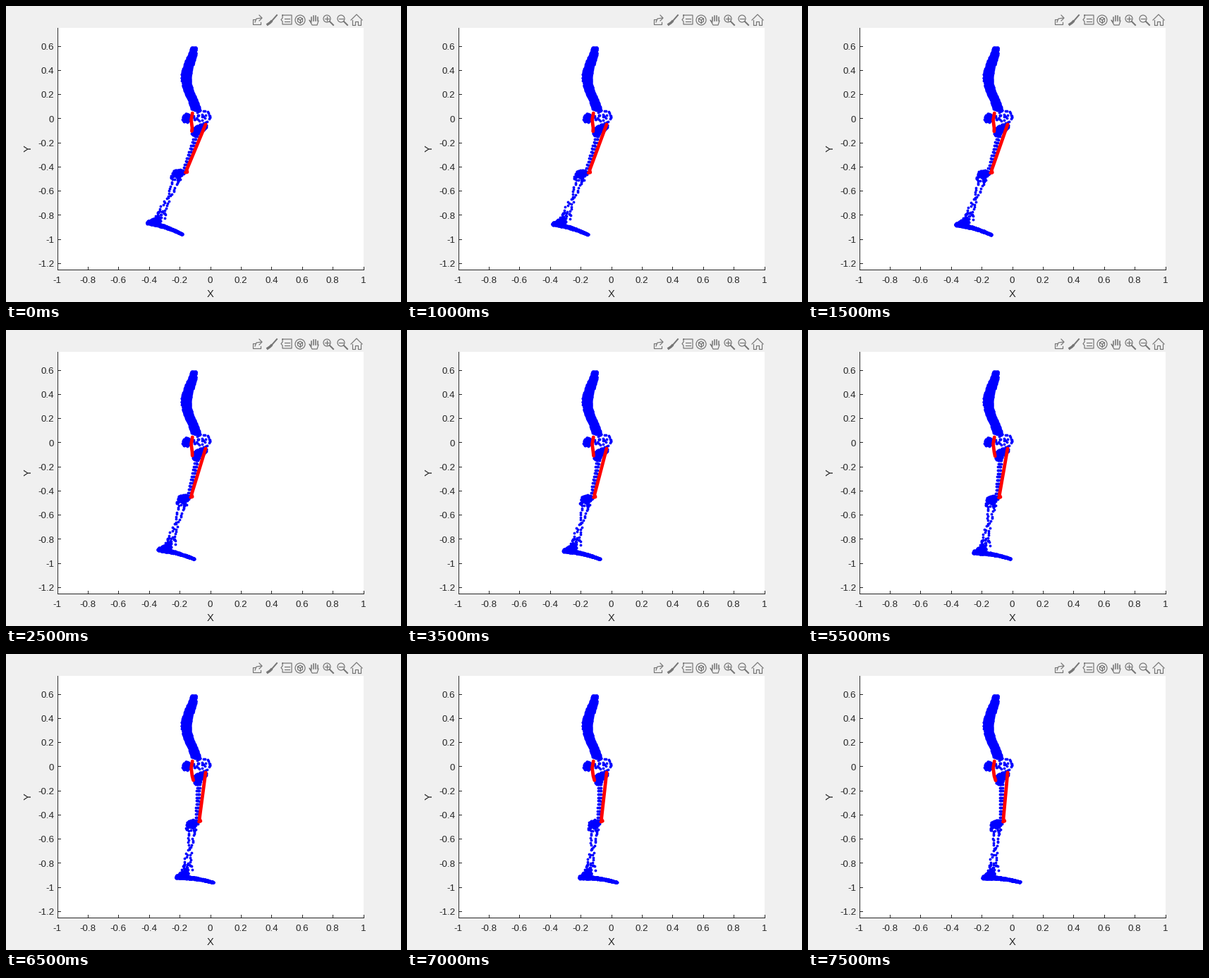
Animation of 560x420 px, one loop 8 s. Source, as a matplotlib script:

```python
import numpy as np
import matplotlib.pyplot as plt
from matplotlib.animation import FuncAnimation
from matplotlib.patches import Circle, Rectangle

W, H, DPI = 560, 420, 100
PX = 72 / DPI                                # points per pixel
FRAMES, STEP_MS = 16, 500
INK, ICON = "#262626", "#757575"
LEFT, RIGHT, TOP, BOTTOM = 72.5, 506.5, 31, 373.5
SCALE = np.array([(RIGHT - LEFT) / 2, (TOP - BOTTOM) / 2])   # pixels per unit
ORIGIN = np.array([(LEFT + RIGHT) / 2, BOTTOM + 1.25 * SCALE[1]])
HIP = np.array([-0.0707, -0.0661])
rng = np.random.default_rng(4)

plt.rcParams["font.family"] = "Liberation Sans"
fig = plt.figure(figsize=(W / DPI, H / DPI), dpi=DPI, facecolor="#f0f0f0")
ax = fig.add_axes([0, 0, 1, 1])
ax.set(xlim=(0, W), ylim=(H, 0))
ax.axis("off")


def line(xy, color=INK, width=1.0, **kw):
    return ax.plot(*np.transpose(xy), color=color, lw=width * PX, **kw)[0]


def label(x, y, s, size=13.33, **kw):
    ax.text(x, y, s, size=size * PX, color=INK, **kw)


def draw_axes():
    ax.add_patch(Rectangle((LEFT - 0.5, TOP), RIGHT - LEFT + 0.5,
                           BOTTOM - TOP, fc="white", ec="none"))
    line([(LEFT, TOP), (LEFT, BOTTOM), (RIGHT, BOTTOM)],
         solid_joinstyle="miter")
    for k in range(-10, 11, 2):
        x = ORIGIN[0] + SCALE[0] * k / 10
        line([(x, BOTTOM), (x, BOTTOM - 4)])
        label(x, 393.3, f"{k / 10:g}", ha="center")
    for k in range(-12, 7, 2):
        y = ORIGIN[1] + SCALE[1] * k / 10
        line([(LEFT, y), (LEFT + 4, y)])
        label(68, y + 5.3, f"{k / 10:g}", ha="right")
    label(ORIGIN[0], 413.3, "X", 14.67, ha="center")
    label(32, 202, "Y", 14.67, rotation=90, ha="center", va="center")


def draw_toolbar():
    """Eight line icons, 20 pixels apart."""
    def stroke(x, *xy, width=1.2):
        line(np.array(xy) + (x, 20), ICON, width)

    def ring(x, y, r):
        ax.add_patch(Circle((x, y), r, fc="none", ec=ICON, lw=1.2 * PX))

    share, brush, tip, orbit, hand, zoom_in, zoom_out, home = \
        np.arange(8) * 20 + 357

    stroke(share, (-4, -1), (-7, -1), (-7, 6), (4, 6), (4, 3))
    stroke(share, (-4, 3), (-2, -2), (5, -3))
    stroke(share, (2, -7), (6, -3), (2, 1))

    stroke(brush, (7, -7), (0, 1), width=2)
    stroke(brush, (-1, 2), (-3, 4), (-6, 6), width=3.4)

    stroke(tip + 1, (-6, -7), (7, -7), (7, 6), (-6, 6), (-6, 2), (-8, -0.5),
           (-6, -3), (-6, -7))
    for y in (-2, 2):
        stroke(tip + 1, (-3, y), (4, y))

    ring(orbit, 20, 7)
    cube = [(4 * np.sin(a), 4 * np.cos(a)) for a in np.arange(7) * np.pi / 3]
    stroke(orbit, *cube)
    for corner in cube[0:6:2]:
        stroke(orbit, (0, 0), corner)

    for k, top in enumerate((-4, -6, -6, -4)):
        stroke(hand, (3 * k - 4, 1), (3 * k - 4, top), width=1.6)
    stroke(hand, (-4, 3), (-7, 0), (-3, 7), (4, 7), (6, 1))

    for x in (zoom_in, zoom_out):
        ring(x - 2, 18, 5)
        stroke(x, (2, 2), (7, 7), width=2)
        stroke(x, (-5, -2), (1, -2))
    stroke(zoom_in, (-2, -5), (-2, 1))

    stroke(home, (-8, 0), (0, -8), (8, 0))
    stroke(home, (-6, 0), (-6, 7), (-2, 7), (-2, 2), (2, 2), (2, 7), (6, 7),
           (6, 0))


def blob(x, y, rx, ry, n, tilt=0):
    """Random points in a tilted ellipse."""
    a, r = rng.uniform(0, 2 * np.pi, n), np.sqrt(rng.uniform(0, 1, n))
    u, v = rx * r * np.cos(a), ry * r * np.sin(a)
    c, s = np.cos(np.radians(tilt)), np.sin(np.radians(tilt))
    return np.column_stack([x + c * u - s * v, y + s * u + c * v])


def trunk():
    u, v = rng.uniform(0, 1, 1800), rng.uniform(-1, 1, 1800)
    mid = 266 + 3 * u - 12.3 * np.sin(np.pi * u) ** 1.6
    spine = np.column_stack([mid + v * (3.2 + 3 * np.tanh(5 * u)),
                             59 + 89 * u + 2 * u * v])
    a = np.radians(np.linspace(-75, 70, 12))
    rim = np.column_stack([277 + 12 * np.cos(a), 157 + 9 * np.sin(a)])
    return np.vstack([spine, rim + rng.normal(0, 0.8, rim.shape),
                      blob(274, 157, 9, 7, 18),              # pelvis
                      blob(255.5, 159, 5, 7, 100, 20),       # sacrum
                      blob(274.5, 173.5, 10.5, 5, 160, -25)])  # hip socket


def leg():
    """Thigh, shin and foot as they stand at the end of the swing."""
    shaft = [(x, y) for y in np.arange(185, 234, 4.7)
             for x in np.linspace(271.5, 275.5, 4)]

    u = np.repeat(np.linspace(0, 1, 18), 2)
    side = np.tile([-1, 1], 18)
    shin = np.column_stack([267 - 5 * u + side * (2 + 4 * (2 * u - 1) ** 2),
                            248 + 58 * u])
    shin += rng.normal(0, 1, shin.shape)

    u, v = rng.uniform(0, 1, 700), rng.uniform(-1, 1, 700)
    foot = np.column_stack([247 + 54 * u, 317 + 6.5 * u
                            - 1.8 * np.sin(np.pi * u) + v * (2.1 - 1.6 * u)])
    return np.vstack([shaft, shin, foot,
                      blob(271, 180, 5.5, 5, 60),      # neck of the femur
                      blob(267, 240.5, 8.5, 5, 110, -15),   # knee
                      blob(266, 247, 8, 5, 20),
                      blob(262, 303, 5, 6, 18),        # ankle
                      blob(258, 313, 7, 4.5, 150, -15)])


def swing(pts, deg):
    """Rotate pixel points about the hip in plot units."""
    c, s = np.cos(np.radians(deg)), np.sin(np.radians(deg))
    d = (np.asarray(pts) - ORIGIN) / SCALE - HIP
    return (d @ [[c, s], [-s, c]] + HIP) * SCALE + ORIGIN


draw_axes()
draw_toolbar()

dots = dict(color="#0000ff", ls="", marker="o", ms=3.8 * PX, mew=0)
ax.plot(*trunk().T, **dots)
LEG = leg()
bone, = ax.plot([], [], **dots)

red = dict(color="#ff0000", width=4.8, solid_joinstyle="round",
           solid_capstyle="round")
# each muscle runs from fixed pelvis points to points on the leg
MUSCLES = [([(264.3, 152), (262.5, 162), (264, 173)], [(266, 179.5)]),
           ([(283, 168)], [(277, 234), (278.8, 237), (276.5, 238)])]
cords = [line(fixed, **red) for fixed, _ in MUSCLES]


def update(i):
    deg = i - (FRAMES - 1)
    bone.set_data(*swing(LEG, deg).T)
    for cord, (fixed, moving) in zip(cords, MUSCLES):
        cord.set_data(*np.vstack([fixed, swing(moving, deg)]).T)
    return bone, *cords


anim = FuncAnimation(fig, update, frames=FRAMES, interval=STEP_MS,
                     repeat=True, repeat_delay=0)
plt.show()
```
